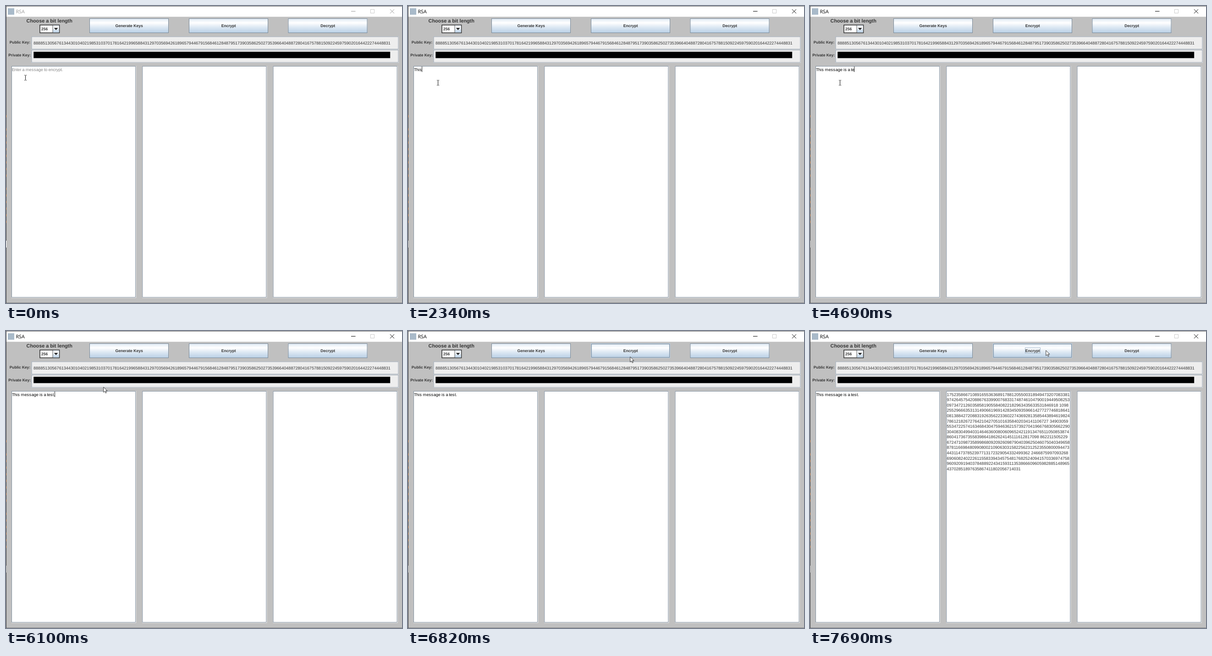
Write an HTML page that moves like this. It is 864 by 648 pixels and loops after 8 s.

```html
<!DOCTYPE html>
<html lang="en">
<head>
<meta charset="utf-8">
<title>RSA</title>
<style>
  html, body { margin: 0; width: 100%; height: 100%; overflow: hidden; background: #c0c0c0; }
  svg { display: block; }
  text {
    font: 9.1px "Liberation Sans", Arial, sans-serif;
    fill: #333; white-space: pre; text-rendering: geometricPrecision;
  }
  .bold { font-weight: bold; font-size: 8.6px; }
  .title { font: 10.7px "Open Sans", "Noto Sans", sans-serif; }
</style>
</head>
<body>
<svg id="stage" width="864" height="648" viewBox="0 0 864 648">
  <defs>
    <linearGradient id="ocean" x1="0" y1="0" x2="0" y2="1">
      <stop offset="0" stop-color="#dde8f3"/>
      <stop offset=".3" stop-color="#fff"/>
      <stop offset=".6" stop-color="#dde8f3"/>
      <stop offset="1" stop-color="#b8cfe5"/>
    </linearGradient>
  </defs>
</svg>
<script>
const LOOP = 8000;
const UNIT = 0.7227;            // screen pixels per interface pixel
const EDGE = '#7a8a99', PALE = '#b8cfe5';
const stage = document.getElementById('stage');

function add(tag, attrs, text, parent = stage) {
  const el = document.createElementNS('http://www.w3.org/2000/svg', tag);
  for (const k in attrs) el.setAttribute(k, attrs[k]);
  if (text) el.textContent = text;
  parent.appendChild(el);
  return el;
}
const rect = (x, y, width, height, fill, more, parent) =>
  add('rect', { x, y, width, height, fill, ...more }, '', parent);
const outline = (x, y, w, h, stroke, parent) =>
  rect(x + .5, y + .5, w - 1, h - 1, 'none', { stroke }, parent);
const label = (x, y, text, more) => add('text', { x, y, ...more }, text);
const bold = (x, y, text, anchor = 'middle', size = 8.6) =>
  label(x, y, text, { class: 'bold', 'text-anchor': anchor, style: `font-size:${size}px` });
const show = (el, on) => el.setAttribute('visibility', on ? 'visible' : 'hidden');

// whole-pixel glyph advances of the interface font
function advance(c) {
  if ('it .'.includes(c)) return 3;
  if (c === 'r') return 4;
  if ('cy'.includes(c)) return 6;
  return c === 'm' ? 11 : 7;
}
function offsets(text, left) {
  const xs = [left];
  for (const c of text) xs.push(xs[xs.length - 1] + advance(c) * UNIT);
  return xs;
}

// window frame
rect(0, 0, 864, 648, '#c0c0c0');
rect(1, 1, 863, 22.5, '#fff');
rect(0, 0, 864, 1, '#6b6b6b');
rect(0, 647, 864, 1, '#858585');
rect(0, 0, 1, 648, '#444');
for (let row = 0; row < 17; row++)
  if (row % 9 !== 1) rect(0, 238 + row * 14.4, 1, 5, '#9c5a2b');
const strip = rect(0, 512, 1, 15, '#fff');
rect(4, 5, 14, 14, '#a9bac9');
const title = label(21.5, 16, 'RSA', { class: 'title' });
const controls = add('path', { d: 'M753 11.5h9.5M838 7.2l9 9M847 7.2l-9 9', fill: 'none' });
outline(795, 7, 9, 9, '#ccc');

// top row
bold(94.7, 36, 'Choose a bit length', 'middle', 10.8);
rect(74, 41.5, 42.5, 17, '#fff', { stroke: '#333', 'stroke-width': 1.6 });
rect(102, 42.3, 13.7, 15.4, 'url(#ocean)');
rect(101.5, 42, 1, 16, '#555');
add('path', { d: 'M104.7 47.8h8.8l-4.4 4.6z', fill: '#222' });
bold(77, 53.4, '256', 'start', 8.5);

function button(x, text) {
  const face = rect(x, 27, 173, 32, 'url(#ocean)');
  outline(x, 27, 173, 32, EDGE);
  const hover = add('g', {});
  outline(x, 27, 173, 32, PALE, hover);
  outline(x + 1, 28, 171, 30, EDGE, hover);
  bold(x + 86.7, 46.2, text);
  show(hover, false);
  return { face, hover };
}
button(182, 'Generate Keys');
const encrypt = button(399, 'Encrypt');
button(615.5, 'Decrypt');
const focus = outline(469, 36, 34, 13, '#a3b8cc');

// keys
function field(y) {
  rect(55.5, y, 801.5, 28.5, '#fff');
  rect(56, y + .5, 800, 27, '#eee', { stroke: '#8794a2', 'stroke-width': .9 });
}
field(66.5);
field(95.5);
bold(53, 82.3, 'Public Key:', 'end', 8.3);
bold(54, 109.7, 'Private Key:', 'end', 8.45);
label(60, 83.8, '8888513056761344301040219853103701781642199658843129703569426189657944679156846128487951739035862502735396640488728041675788150922459759020164422274448831');
const secret = label(60, 112.8, '8365659347540088753920206920568189912133834973028827983300636413795712639206265925186634610514851385391707806428304546037443383450201313108752583831200625');
const mask = rect(60.2, 99.8, 778, 13.9, '#000');

// message panes
for (let i = 0; i < 3; i++) {
  const x = 12 + i * 285.3;
  rect(x, 131, 272, 506, '#eee');
  rect(x + .5, 131.5, 270, 504, '#fff', { stroke: '#8391a0' });
}

// bursts of typing: start time, letters
const BURSTS = [
  [1950, 'T'], [2170, 'his '], [2620, 'me'], [2860, 's'], [3360, 's'], [3570, 'a'],
  [3750, 'ge is'], [4200, ' a '], [4540, 't'], [4690, 'est.']
];
const KEY_GAP = 80, CLICK = 1240, PRESS = 7380, DONE = 7690;
const MESSAGE = BURSTS.map(b => b[1]).join('');
const keyTimes = BURSTS.flatMap(([at, text]) => [...text].map((_, i) => at + i * KEY_GAP));

const HINT = 'Enter a message to encrypt.';
const hint = label(offsets(HINT, 13).join(' '), 141.8, HINT, { style: 'fill:#858585' });
const stops = offsets(MESSAGE, 13);
const message = label(stops.join(' '), 141.8, '', { style: 'fill:#000' });
const caret = rect(13, 132, 1, 12, '#222');

const cipher = add('g', {});
`17523586671089165536368917881205500318949473207083381
97426457542088676339900768331748746104790019449508253
097347212603585819055840822182963435633531846918 1098
25529666353131490661969142834509359661427727746818641
08138842720883192635622336022743692813585443894619824
78612182672764210427051016358402034141106727 34903059
55347225741634684304759463621573927041966768305662290
30408304994031464636008006096524211913476511050853874
8604173673558398641862624145111612817098 862211505229
67247109873589986809209260987904039625046075040349658
87811669848099080021090630315822562312523550800094473
443114737852397713172329054332499362 2466875997093268
69060824022261155833943457548176825240941570336974758
96092091940378488922434159311353866609605982885148965
43702851897635867411802056714031`.split('\n').forEach((line, i) =>
  add('text', { x: 298.5, y: 141.8 + i * 16 * UNIT }, line, cipher));

// pointers
const beam = add('path', {
  d: 'M-2.5 -5.5H-.6M.6 -5.5H2.5M0 -5V5M-2.5 5.5H-.6M.6 5.5H2.5',
  stroke: '#222', 'stroke-width': 1.1, fill: 'none'
});
const arrow = add('path', {
  d: 'M.3 .3V11.8L3 9.3L4.9 13.5L6.7 12.7L4.9 8.7H8.5Z',
  fill: '#fff', stroke: '#222', 'stroke-width': .9
});

// time, x, y
const PATH = [
  [430, 42.5, 156.5], [520, 65.5, 167.5], [5920, 65.5, 167.5], [6100, 212.5, 122],
  [6200, 281, 106], [6390, 281, 106], [6520, 329, 99.5], [6820, 484.5, 56], [6930, 514.5, 42]
];
function pointerAt(time) {
  const t = Math.floor((time - 10) / 30) * 30 + 10;   // mouse is polled
  const next = PATH.findIndex(p => p[0] > t);
  if (next < 1) return PATH[next ? PATH.length - 1 : 0].slice(1);
  const [a, b] = [PATH[next - 1], PATH[next]];
  const k = (t - a[0]) / (b[0] - a[0]);
  return [1, 2].map(i => a[i] + (b[i] - a[i]) * k);
}

function caretOn(t, typed) {
  const since = t - (typed ? keyTimes[typed - 1] : CLICK);
  return t >= CLICK && t < PRESS + 60 && (since < 60 || Math.floor((since - 60) / 500) % 2 === 0);
}

function draw(t) {
  const active = t >= CLICK;
  const ink = active ? '#000' : '#999';
  title.style.fill = ink;
  controls.setAttribute('stroke', ink);
  strip.setAttribute('fill', active ? '#aaa' : '#fff');
  show(hint, !active);

  const typed = keyTimes.filter(k => k <= t).length;
  message.textContent = MESSAGE.slice(0, typed);
  caret.setAttribute('x', Math.floor(stops[typed]));
  show(caret, caretOn(t, typed));

  const [x, y] = pointerAt(t);
  const inPane = y > 131.5;
  show(beam, inPane);
  show(arrow, !inPane);
  (inPane ? beam : arrow).setAttribute('transform', `translate(${x} ${y})`);

  const reveal = y > 96 && y < 121;
  show(secret, reveal);
  show(mask, !reveal);

  show(encrypt.hover, x > 399 && x < 572 && y < 59);
  encrypt.face.setAttribute('fill', t >= PRESS && t < DONE ? PALE : 'url(#ocean)');
  show(focus, t >= PRESS + 60);
  show(cipher, t >= DONE);
}

const start = performance.now();
function tick() {
  draw((performance.now() - start) % LOOP);
  requestAnimationFrame(tick);
}
tick();
</script>
</body>
</html>
```
